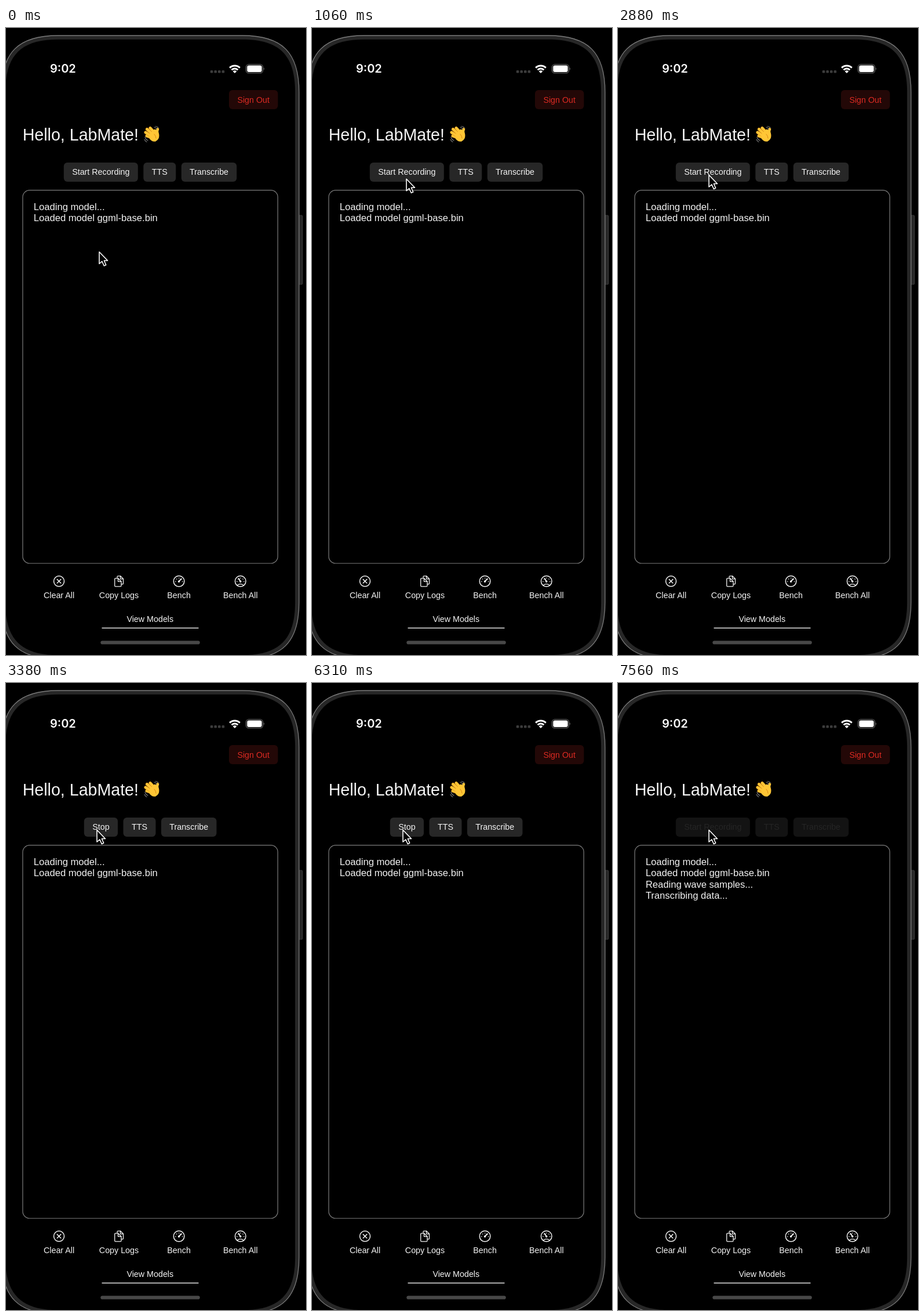
These frames come from a looping animation (518 px wide and 1081 px high, 8000 ms). An HTML page:

```html
<!DOCTYPE html>
<html lang="en">
<head>
<meta charset="utf-8">
<title>Voice transcription demo</title>
<style>
  html, body { margin: 0; width: 100%; height: 100%; overflow: hidden; background: #000; }
  svg { display: block; width: 518px; height: 1081px; }
  text { font: 14.3px "Liberation Sans", Arial, sans-serif; fill: #f4f4f4; }
  .mid { text-anchor: middle; }
  .title { font-size: 28.6px; }
  .log { font-size: 16.6px; }
  .clock { font: 600 20px Inter, sans-serif; fill: #fff; }
  .icon { fill: none; stroke: #f2f2f2; stroke-width: 1.5; stroke-linecap: round; stroke-linejoin: round; }
</style>
</head>
<body>
<svg viewBox="0 0 518 1081" xmlns="http://www.w3.org/2000/svg">
  <rect width="518" height="1081"/>

  <!-- Phone body -->
  <rect x="503" y="323" width="9" height="119" rx="1.5" fill="#282828" stroke="#454545" stroke-width=".8"/>
  <path id="shell" fill="#272727" stroke="#7b7b7b" stroke-width="1.3"/>
  <path id="screen"/>

  <!-- Status bar -->
  <text class="clock" x="76" y="77.3">9:02</text>
  <g id="dots" fill="#3c3c3c"></g>
  <g fill="none" stroke="#fff" stroke-width="3">
    <path d="M386.2 68.6A12.6 12.6 0 0 1 403.8 68.6"/>
    <path d="M389.6 72.3A7.7 7.7 0 0 1 400.4 72.3"/>
  </g>
  <path d="M395 78L391.7 74.7A4.7 4.7 0 0 1 398.3 74.7Z" fill="#fff"/>
  <rect x="414.5" y="62.8" width="29" height="15" rx="4.6" fill="none" stroke="#777" stroke-width="1.1"/>
  <rect x="416.3" y="64.6" width="25.4" height="11.4" rx="3" fill="#fff"/>
  <path d="M445 68Q447 70.3 445 72.6Z" fill="#777"/>

  <!-- Header -->
  <rect x="385" y="107" width="84.5" height="33" rx="6" fill="#230807"/>
  <text class="mid" x="427.2" y="128.6" style="fill:#dc2a22">Sign Out</text>
  <text class="title" x="28.7" y="193.6">Hello, LabMate!</text>
  <g id="hand" fill="none" stroke-linecap="round" stroke-linejoin="round">
    <g id="fingers"></g>
    <path d="M249 184L257 176L262 181Q265 190 258 194Q253 195 249 190Z" fill="#ffc636" stroke="#ffc636" stroke-width="3"/>
    <path d="M262 184Q260 178 262 174.5" stroke="#ffc636" stroke-width="4.6"/>
    <path d="M256 183Q259 186 259 190" stroke="#d98a16" stroke-width="1"/>
    <g stroke="#777" stroke-width="1.1">
      <path d="M256 171Q259.500 172 260 175M258 169.500Q262 170 263 172M240 188Q241 192 245 194M239 192Q240 195 243 196.500"/>
    </g>
  </g>

  <g id="buttons"></g>

  <!-- Log panel -->
  <rect x="28.9" y="279.6" width="440.4" height="643.4" rx="12" fill="#000" stroke="#7c7c7c" stroke-width="1.2"/>
  <g id="log"></g>

  <!-- Tool row -->
  <g class="icon">
    <g transform="translate(91.5 953.8)">
      <circle r="9"/>
      <path d="M-3.200-3.200L3.200 3.200M3.200-3.200L-3.200 3.200"/>
    </g>
    <g transform="translate(195 953.8)" stroke-width="1.3">
      <path d="M-3-6V-7.700Q-3-9-1.700-9H2.500L7.500-4V3.500Q7.500 5 6 5H4"/>
      <path d="M2.500-9V-4H7.500"/>
      <path d="M-6-5H-1.500L4 .5V7.700Q4 9 2.700 9H-6Q-7.300 9-7.300 7.700V-3.700Q-7.300-5-6-5Z"/>
      <path d="M-1.500-5V.5H4"/>
    </g>
    <g class="gauge" transform="translate(298.6 953.8)">
      <path d="M-.5 .8L4-4" stroke-width="2"/>
    </g>
    <g class="gauge" transform="translate(404.8 953.8)">
      <path d="M.3 .8L-3-4.500" stroke-width="2"/>
      <path d="M-5.500 7Q0 2.500 5.500 7" stroke-width="1.2"/>
    </g>
  </g>
  <g id="labels"></g>
  <text class="mid" x="248.8" y="1023.5">View Models</text>
  <path d="M165.500 1034.500H332.500" stroke="#e6e6e6" stroke-width="1.3"/>
  <rect x="163.300" y="1056.400" width="171.500" height="6.200" rx="3.100" fill="#484848"/>

  <path id="cursor" d="M0 0V20.500L4.800 16.300L8.300 24L11.700 22.500L8.400 15H14.500Z"
        fill="#000" stroke="#fff" stroke-width="1.6" stroke-linejoin="round"/>
</svg>

<script>
const LOOP = 8000;
const $ = id => document.getElementById(id);

function add(parent, tag, attrs, text = "") {
  const el = document.createElementNS("http://www.w3.org/2000/svg", tag);
  for (const key in attrs) el.setAttribute(key, attrs[key]);
  el.textContent = text;
  return parent.appendChild(el);
}

// Smooth-cornered phone outline, symmetric about x = 249
function bodyPath(inset) {
  const l = -8 + inset, r = 506 - inset, t = 13 + inset, b = 1088 - inset;
  const k = 98 - inset, a = 29 - inset * .3;
  return `M${l + k} ${t}H${r - k}C${r - a} ${t} ${r} ${t + a} ${r} ${t + k}` +
    `V${b - k}C${r} ${b - a} ${r - a} ${b} ${r - k} ${b}` +
    `H${l + k}C${l + a} ${b} ${l} ${b - a} ${l} ${b - k}` +
    `V${t + k}C${l} ${t + a} ${l + a} ${t} ${l + k} ${t}Z`;
}
$("shell").setAttribute("d", bodyPath(0));
$("screen").setAttribute("d", bodyPath(6.8));

for (let i = 0; i < 4; i++)
  add($("dots"), "rect", { x: 352.8 + i * 6.6, y: 73, width: 4.6, height: 4.6, rx: 1.4 });

for (const d of ["M252 189L243 186", "M252 187L241 180", "M254 184L243.500 174.500", "M257 181L249 172.500"]) {
  add($("fingers"), "path", { d, stroke: "#dc911d", "stroke-width": 5.2 });
  add($("fingers"), "path", { d, stroke: "#ffc636", "stroke-width": 4.1 });
}

for (const gauge of document.querySelectorAll(".gauge")) {
  add(gauge, "circle", { r: 9.3 });
  add(gauge, "circle", { r: 1, cy: .5, fill: "#f2f2f2" });
  for (let deg = 180; deg <= 360; deg += 45) {
    const a = deg * Math.PI / 180;
    add(gauge, "circle", { cx: 6 * Math.cos(a), cy: 6 * Math.sin(a) + .5, r: .35, "stroke-width": .8 });
  }
}

[["Clear All", 91.6], ["Copy Logs", 195], ["Bench", 298.6], ["Bench All", 404.8]]
  .forEach(([name, x]) => add($("labels"), "text", { x, y: 983, class: "mid" }, name));

const lines = [
  ["Loading model...", 0],
  ["Loaded model ggml-base.bin", 0],
  ["Reading wave samples...", 7130],
  ["Transcribing data...", 7190]
].map(([text, from], i) => ({
  from, el: add($("log"), "text", { x: 47.8, y: 314.2 + i * 19.2, class: "log" }, text)
}));

function makeRow(first, x, firstWidth) {
  const row = add($("buttons"), "g", {});
  for (const [name, width] of [[first, firstWidth], ["TTS", 56], ["Transcribe", 95.5]]) {
    const button = add(row, "g", {});
    add(button, "rect", { x, y: 232, width, height: 33, rx: 6 });
    add(button, "text", { x: x + width / 2, y: 253.3, class: "mid" }, name);
    x += width + 9.5;
  }
  return row;
}
const idleRow = makeRow("Start Recording", 99.8, 128);
const stopRow = makeRow("Stop", 134.8, 58.2);

// [time, opacity of the pressed button]
const press = [[0, 1], [3130, .85], [3190, .65], [3250, .85], [3380, 1],
               [7000, .85], [7060, .68], [7130, 1]];

// Cursor moves in discrete steps, the first landing at its start time
const moves = [
  { start: 60, end: 380, steps: 6, from: [161, 386], to: [169, 267] },
  { start: 810, end: 1310, steps: 8, from: [169, 267], to: [157, 253.5] }
];
const ease = p => p * p * (3 - 2 * p);

function cursorAt(t) {
  let pos = moves[0].from;
  for (const { start, end, steps, from, to } of moves) {
    if (t < start) break;
    const step = Math.floor((t - start) / (end - start) * (steps - 1) + 1e-6) + 1;
    const p = ease(Math.min(1, step / steps));
    pos = from.map((v, i) => v + (to[i] - v) * p);
  }
  return pos;
}

function render(t) {
  const stopping = t >= 3250 && t < 7130;
  const disabled = t >= 7130;
  const row = stopping ? stopRow : idleRow;
  idleRow.style.display = stopping ? "none" : "";
  stopRow.style.display = stopping ? "" : "none";
  for (const button of row.children) {
    button.children[0].style.fill = disabled ? "#131313" : "#272727";
    button.children[1].style.fill = disabled ? "#252525" : "#f4f4f4";
  }
  row.firstChild.style.opacity = press.filter(([at]) => at <= t).pop()[1];
  for (const { el, from } of lines) el.style.display = t >= from ? "" : "none";
  $("cursor").setAttribute("transform", `translate(${cursorAt(t)})`);
}

const origin = performance.now();
function tick() {
  render((performance.now() - origin) % LOOP);
  requestAnimationFrame(tick);
}
tick();
</script>
</body>
</html>
```
